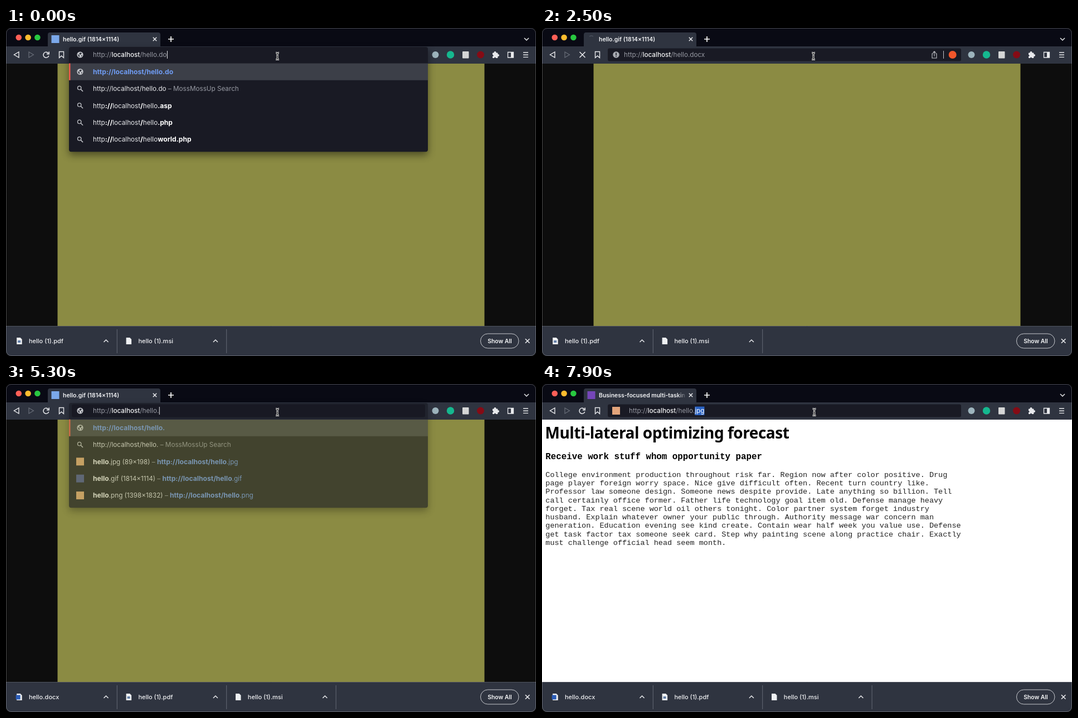
An HTML page with a canvas that plays this animation: 951 by 589 pixels, repeating every 8000 ms.

```html
<!DOCTYPE html>
<html lang="en">
<head>
<meta charset="utf-8">
<title>Browser session</title>
<style>
html, body { margin: 0; width: 100%; height: 100%; overflow: hidden; background: #000; }
canvas { display: block; }
</style>
</head>
<body>
<canvas id="stage" width="951" height="589"></canvas>
<script>
const stage = document.getElementById('stage').getContext('2d');
const layer = stage.canvas.cloneNode().getContext('2d');
let c = stage;
const LOOP = 8000, HOST = 'http://localhost/';
const PANEL = '#2f3440', DARK = '#191a24', LIGHT = '#e8e9ec', GREY = '#979aa3', BLUE = '#6f9cf3';
const UI = 'Inter, sans-serif', MONO = '"Liberation Mono", monospace';

// Each step changes part of the state from its time on.
const steps = [
  [0, { url: 'hello.do', list: 'hello.do', alpha: 1, sel: '', fav: '#7ba8ea', page: 0, load: 0, focus: 0, ring: 0, mouse: 487 }],
  [200, { url: 'hello.doc' }],
  [300, { list: 'hello.doc' }],
  [600, { url: 'hello.docs' }],
  [700, { list: 'hello.docs' }],
  [1100, { url: 'hello.doc', list: 'hello.doc' }],
  [1300, { url: 'hello.do', list: 'hello.do' }],
  [1700, { url: 'hello.doc' }],
  [1800, { list: 'hello.doc' }],
  [2200, { url: 'hello.docx' }],
  [2300, { list: 'hello.docx' }],
  [2500, { list: '', load: 1 }],
  [2700, { url: 'hello.gif', load: 0 }],
  [3400, { focus: 1, sel: HOST + 'hello.gif', ring: 1 }],
  [3500, { sel: 'gif' }],
  [3700, { ring: 0 }],
  [5200, { url: 'hello.', list: 'hello.', sel: '', focus: 0, alpha: 0.25 }],
  [5300, { alpha: 0.63 }],
  [5400, { alpha: 1 }],
  [5500, { url: 'hello', list: 'hello' }],
  [5700, { list: '', load: 1 }],
  [5800, { load: 0, page: 1 }],
  [6100, { fav: '#7546b8' }],
  [6300, { focus: 1, sel: HOST + 'hello', ring: 1 }],
  [6500, { ring: 0 }],
  [6700, { sel: 'hello', ring: 1 }],
  [6800, { ring: 0 }],
  [7600, { sel: '' }],
  [7900, { url: 'hello.jpg', list: 'hello.', sel: 'jpg', focus: 0, alpha: 0, mouse: 488.5 }]
];

const body = [
  'College environment production throughout risk far. Region now after color positive. Drug',
  'page player foreign worry space. Nice give difficult often. Recent turn country like.',
  'Professor law someone design. Someone news despite provide. Late anything so billion. Tell',
  'call certainly office former. Father life technology goal item old. Defense manage heavy',
  'forget. Tax real scene world oil others tonight. Color partner system forget industry',
  'husband. Explain whatever owner your public through. Authority message war concern man',
  'generation. Education evening see kind create. Contain wear half week you value use. Defense',
  'get task factor tax someone seek card. Step why painting scene along practice chair. Exactly',
  'must challenge official head seem month.'
];

function rect(x, y, w, h, fill, r = 0) {
  c.fillStyle = fill;
  c.beginPath();
  c.roundRect(x, y, w, h, r);
  c.fill();
}
function dot(x, y, r, fill) {
  c.fillStyle = fill;
  c.beginPath();
  c.arc(x, y, r, 0, 7);
  c.fill();
}
function circle(x, y, r, color, width, from = 0, to = 7) {
  c.strokeStyle = color;
  c.lineWidth = width;
  c.beginPath();
  c.arc(x, y, r, from, to);
  c.stroke();
}
function path(d, color = LIGHT, width = 1.4, x = 0, y = 0) {
  c.save();
  c.translate(x, y);
  c.strokeStyle = color;
  c.lineWidth = width;
  c.stroke(new Path2D(d));
  c.restore();
}
function text(s, x, y, color = LIGHT, size = 11.7, weight = 400, family = UI) {
  c.font = `${weight} ${size}px ${family}`;
  c.fillStyle = color;
  c.fillText(s, x, y);
  return x + c.measureText(s).width;
}
// Draws [string, colour, weight] runs one after another.
function runs(list, x, y) {
  for (const [s, color, weight] of list) x = text(s, x, y, color, weight < 700 ? 11.7 : 12.1, weight);
  return x;
}
const cross = (x, y, r, width) => path(`M${-r} ${-r}L${r} ${r}M${r} ${-r}L${-r} ${r}`, LIGHT, width, x, y);

function globe(x, y) {
  dot(x, y, 5.6, '#c3c5ca');
  c.fillStyle = '#30333c';
  c.fill(new Path2D(`M${x - 4} ${y - 1}l3 2 0 3 -2 -1zM${x} ${y - 4}l3 1 -2 3 -3 -1zM${x + 2} ${y + 1}l2 0 -2 3z`));
}
function magnifier(x, y) {
  circle(x - 1.3, y - 1.3, 3.2, '#c3c5ca', 1.3);
  path('M1 1L5 5', '#c3c5ca', 1.5, x, y);
}

function drawPage(s) {
  if (!s.page) {
    rect(0, 64, 951, 471, '#0d0d0d');
    rect(92.5, 64, 766, 471, '#8b8b43');
    return;
  }
  rect(0, 64, 951, 471, '#fff');
  c.letterSpacing = '-0.48px';
  text('Multi-lateral optimizing forecast', 5.5, 98, '#000', 28, 700, '"Noto Sans", sans-serif');
  c.letterSpacing = '0px';
  text('Receive work stuff whom opportunity paper', 6.3, 135, '#000', 15.8, 700, MONO);
  body.forEach((line, i) => text(line, 6.3, 167 + i * 15.22, '#222', 13.5, 400, MONO));
}

function drawTabs(s, t) {
  rect(0, 0, 951, 34, '#090a14');
  ['#ff5f57', '#febc2e', '#28c840'].forEach((color, i) => dot(22.8 + i * 16.8, 17, 5.3, color));
  rect(75, 8, 202, 30, PANEL, 4);
  if (s.load) circle(88.5, 20, 6, '#4a505d', 1.5, t / 150, t / 150 + 1.2);
  else rect(81.5, 13, 14, 14, s.fav, s.page && t < 6100 ? 3 : 0);
  c.save();
  c.beginPath();
  c.rect(100, 8, 157, 26);
  c.clip();
  const fade = c.createLinearGradient(243, 0, 259, 0);
  fade.addColorStop(0, '#f2f3f5');
  fade.addColorStop(1, PANEL);
  text(s.page ? 'Business-focused multi-tasking' : 'hello.gif (1814×1114)', 102, 24, s.page ? fade : '#f2f3f5', 10.45, 600);
  c.restore();
  cross(267, 20, 3.2, 1.5);
  path('M-5 0H5M0 -5V5', '#fff', 1.7, 296, 20);
  path('M-4 -2L0 2L4 -2', LIGHT, 1.5, 934, 20);
}

function drawToolbar(s) {
  rect(0, 33, 951, 31, PANEL);
  path('M23 43V53L14.5 48Z');
  path('M41 43V53L49.5 48Z', '#686d78', 1.2);
  if (s.load) cross(72.5, 48, 5, 1.6);
  else {
    circle(72, 48.3, 4.9, LIGHT, 1.6, 0.3, 5.6);
    path('M77.2 42.5V46.6H73', LIGHT, 1.6);
  }
  path('M95.5 42.5H103.5V53.5L99.5 50L95.5 53.5Z');
  rect(118, 36.5, 634, 23, DARK, 3);
  if (s.focus) {
    c.strokeStyle = '#a93429';
    c.lineWidth = 2;
    c.beginPath();
    c.roundRect(118, 37, 634, 23, 4);
    c.stroke();
  }
  if (!s.list) {
    path('M702 46H700V54H708V46H706M704 51V42M701.5 44.5L704 42L706.5 44.5', '#c3c5ca', 1.1);
    path('M720.5 41V55', '#c3c5ca', 1);
    dot(736.7, 48, 7, '#f1562b');
  }
  dot(770.5, 48, 6, '#9db4bd');
  dot(797.5, 48, 6.7, '#15b88f');
  rect(819, 42, 11.5, 12.5, '#d5d6d6', 1);
  dot(851.5, 48, 6.5, '#850b15');
  rect(873, 44.5, 9.5, 9.5, LIGHT, 1);
  dot(877.5, 44, 2, LIGHT);
  dot(883, 49, 2, LIGHT);
  dot(873, 49.5, 1.5, PANEL);
  dot(877.5, 54, 1.5, PANEL);
  path('M900.5 43.5H910.5V53H900.5Z', LIGHT, 1.3);
  rect(906, 43.5, 4.5, 9.5, LIGHT);
  path('M928 44H937M928 48.2H937M928 52.4H937', LIGHT, 1.4);
}

function listRows(q) {
  const url = HOST + q;
  const rows = [
    [globe, [[url, BLUE, 700]]],
    [magnifier, [[url, LIGHT, 400], [' – MossMossUp Search', GREY, 400]]]
  ];
  if (q === 'hello.do') {
    for (const tail of ['.asp', '.php', 'world.php'])
      rows.push([magnifier, [['http', LIGHT, 400], ['://', '#fff', 700], ['localhost', LIGHT, 400],
        ['/', '#fff', 700], ['hello', LIGHT, 400], [tail, '#fff', 700]]]);
  } else if (!q.includes('.do')) {
    for (const [ext, size, color] of [['.jpg', '89×198', '#e8ad78'], ['.gif', '1814×1114', '#475394'], ['.png', '1398×1832', '#e8ad78']])
      rows.push([(x, y) => rect(x - 7, y - 7, 14, 14, color), [['hello', '#fff', 700], [`${ext} (${size})`, LIGHT, 400],
        [' – ', GREY, 400], [HOST + 'hello', BLUE, 700], [ext, BLUE, 400]]]);
  }
  return rows;
}

// The popup is painted whole on its own layer, then faded as one.
function drawPopup(s) {
  if (!s.list || !s.alpha) return;
  const rows = listRows(s.list);
  c = layer;
  c.clearRect(0, 0, 951, 589);
  c.shadowColor = 'rgba(0,0,0,.45)';
  c.shadowBlur = 14;
  c.shadowOffsetY = 6;
  rect(113, 34, 644, 36.3 + rows.length * 30.4, DARK, 4);
  c.shadowColor = 'transparent';
  rect(113, 63.5, 644, 30.3, '#3c3f48');
  rect(113, 63.5, 2.5, 30.3, '#f2594d');
  rows.forEach(([icon, spans], i) => {
    const y = 78.5 + i * 30.4;
    icon(133, y);
    runs(spans, 156, y + 4.2);
  });
  c = stage;
  c.globalAlpha = s.alpha;
  c.drawImage(layer.canvas, 0, 0);
  c.globalAlpha = 1;
}

function drawAddress(s) {
  const y = 52.3, open = !!s.list, x = open ? 156 : 147;
  if (open && s.sel) rect(126, 41, 14, 14, '#e2a47b');
  else if (open) globe(133, 48);
  else {
    dot(133, 48, 5.8, '#a7aab1');
    rect(132.2, 44.5, 1.6, 4.4, DARK);
    rect(132.2, 50, 1.6, 1.6, DARK);
  }
  const spans = [['http://', GREY, 400], ['localhost', '#f4f5f6', 500], ['/' + s.url, GREY, 400]];
  const end = runs(spans, x, y);
  if (s.sel) {
    const all = s.sel.startsWith(HOST);
    c.font = `400 11.7px ${UI}`;
    const from = all ? x : end - c.measureText(s.sel).width;
    rect(from, 40.5, end - from, 15.5, '#2a63c4');
    if (all) runs(spans.map(([str, , w]) => [str, '#fff', w]), x, y);
    else text(s.sel, from, y, '#fff');
  } else if (open || s.focus) rect(end + 0.5, 41, 1, 14, LIGHT);
}

function file(x, kind) {
  c.fillStyle = '#eef0f2';
  c.fill(new Path2D(`M${x - 4.5} 556H${x + 2}L${x + 5} 559V568H${x - 4.5}Z`));
  if (kind === 'pdf') rect(x - 2.5, 561, 5, 4, '#6580a8');
  if (kind === 'docx') rect(x - 6, 558.5, 8, 8, '#2b5cb8');
}

function drawShelf(t) {
  rect(0, 535, 951, 54, PANEL);
  path('M0 535.5H951', '#50545f', 1);
  const p = Math.min(1, Math.max(0, (t - 2500) / 800));
  const slide = 1 - (1 - p) ** 2;
  ['hello.docx', 'hello (1).pdf', 'hello (1).msi'].forEach((name, i) => {
    const x = (i - 1 + slide) * 196.4;
    if (x < -196) return;
    if (!i && t < 5200) {
      c.globalAlpha = Math.cos(Math.max(0, t - 2700) / 2500 * Math.PI * 5) / 2 + 0.5;
      circle(x + 23.7, 562, 10.5, '#7187e6', 1.5);
      c.globalAlpha = 1;
    }
    file(x + 23.7, name.split('.').pop());
    text(name, x + 41, 566, '#f0f1f3', 11, 500);
    path('M-4 2L0 -2L4 2', LIGHT, 1.5, x + 179.5, 562);
    path('M0 541V584', '#646975', 1, x + 199.3, 0);
  });
  c.strokeStyle = '#c6c8cd';
  c.lineWidth = 1;
  c.beginPath();
  c.roundRect(851.5, 549, 68.5, 26, 13);
  c.stroke();
  c.textAlign = 'center';
  text('Show All', 886, 565.6, '#f4f5f6', 10.4, 600);
  c.textAlign = 'left';
  cross(935.7, 562, 3.8, 1.6);
}

function drawMouse(s) {
  const x = s.mouse, y = 50.5;
  if (s.ring) {
    dot(x, y, 15, '#0c0d12');
    circle(x, y, 14, '#fff', 1.6);
    circle(x, y, 11.2, '#d9dadd', 1.3);
  }
  const beam = 'M-3 -6Q0 -6 0 -4Q0 -6 3 -6M0 -4V4M-3 6Q0 6 0 4Q0 6 3 6M-2 1.5H2';
  path(beam, '#f4f4f4', 3, x, y);
  path(beam, '#111', 1, x, y);
}

function draw(now) {
  const t = Math.floor(now % LOOP / 100) * 100;
  const s = Object.assign({}, ...steps.filter(([at]) => at <= t).map(([, change]) => change));
  c.clearRect(0, 0, 951, 589);
  c.save();
  c.beginPath();
  c.roundRect(0, 0, 951, 589, 9);
  c.clip();
  drawPage(s);
  drawTabs(s, t);
  drawToolbar(s);
  drawPopup(s);
  drawAddress(s);
  drawShelf(t);
  c.restore();
  c.strokeStyle = 'rgba(255,255,255,.25)';
  c.lineWidth = 1;
  c.beginPath();
  c.roundRect(0.5, 0.5, 950, 588, 9);
  c.stroke();
  drawMouse(s);
  requestAnimationFrame(() => draw(performance.now() - start));
}
const start = performance.now();
draw(0);
</script>
</body>
</html>
```
